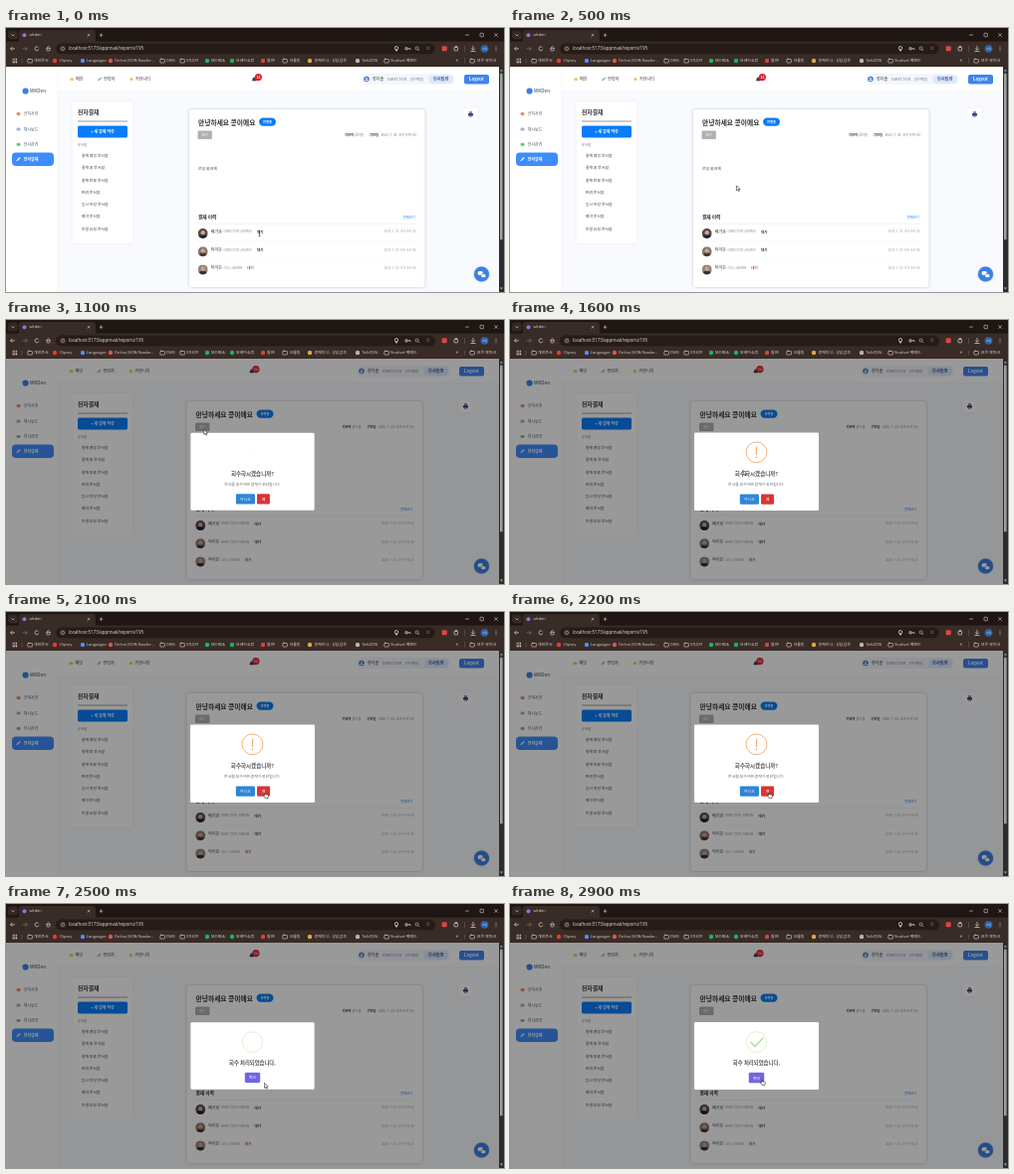
These frames come from a looping animation (500x266 px, 3000 ms). An HTML page with a canvas:

```html
<!DOCTYPE html>
<html lang="ko">
<head>
<meta charset="utf-8">
<style>
html, body { margin: 0; width: 100%; height: 100%; overflow: hidden; background: #fff; }
canvas { display: block; width: 500px; height: 266px; }
</style>
</head>
<body>
<canvas id="stage"></canvas>
<script>
const LOOP = 3000, W = 500, H = 266, PAGE_TOP = 39, PAGE_RIGHT = 495;
const APP = '"Noto Sans CJK KR", "Noto Sans CJK", "Noto Sans", sans-serif';
const CHROME = '"Open Sans", "Noto Sans CJK KR", sans-serif';
const canvas = document.getElementById('stage');
const ctx = canvas.getContext('2d');
const ratio = window.devicePixelRatio || 1;
canvas.width = W * ratio;
canvas.height = H * ratio;

const clamp = (v) => Math.max(0, Math.min(1, v));
const lerp = (a, b, k) => a + (b - a) * k;
const ease = (k) => k * k * (3 - 2 * k);
const move = (x, y) => ctx.transform(1, 0, 0, 1, x, y);

function box(x, y, w, h, r, fill) {
  ctx.fillStyle = fill;
  ctx.beginPath();
  ctx.roundRect(x, y, w, h, r);
  ctx.fill();
}

function frame(x, y, w, h, r, color, width = 0.6) {
  ctx.strokeStyle = color;
  ctx.lineWidth = width;
  ctx.beginPath();
  ctx.roundRect(x, y, w, h, r);
  ctx.stroke();
}

function disc(x, y, r, fill) {
  ctx.fillStyle = fill;
  ctx.beginPath();
  ctx.arc(x, y, r, 0, 7);
  ctx.fill();
}

function ring(x, y, r, color, width = 0.6, from = 0, to = Math.PI * 2) {
  ctx.strokeStyle = color;
  ctx.lineWidth = width;
  ctx.beginPath();
  ctx.arc(x, y, r, from, to);
  ctx.stroke();
}

function line(color, width, ...p) {
  ctx.strokeStyle = color;
  ctx.lineWidth = width;
  ctx.beginPath();
  for (let i = 0; i < p.length; i += 2) ctx.lineTo(p[i], p[i + 1]);
  ctx.stroke();
}

// Drawn at a tenth of a larger font so tiny glyphs keep fractional advances.
function text(s, x, y, size, color, weight = 400, align = 'left', family = APP) {
  ctx.save();
  move(x, y);
  ctx.scale(0.1, 0.1);
  ctx.font = `${weight} ${size * 10}px ${family}`;
  ctx.textAlign = align;
  ctx.textBaseline = 'middle';
  ctx.fillStyle = color;
  ctx.fillText(s, 0, 0);
  ctx.restore();
}

function shifted(dx, draw) {
  ctx.save();
  move(dx, 0);
  draw();
  ctx.restore();
}

function shadowed(blur, color, draw) {
  ctx.save();
  ctx.shadowBlur = blur * ratio;
  ctx.shadowColor = color;
  draw();
  ctx.restore();
}

function pen(x, y, color) {
  line(color, 1.1, x - 1.6, y + 1.6, x + 1.7, y - 1.7);
}

function folder(x, y) {
  frame(x - 2.2, y - 1.5, 4.6, 3.5, 0.5, '#d8d2cf', 0.6);
  line('#d8d2cf', 0.6, x - 2, y - 2, x - 0.2, y - 2);
}

function drawBrowser() {
  const ink = '#dcd6d3';
  box(0, 0, W, 14, 0, '#1e1613');
  box(0, 13.5, W, PAGE_TOP - 13.5, 0, '#392b26');
  box(13, 2, 77, 13, [3, 3, 0, 0], '#392b26');
  box(2, 2.5, 10, 9, 2.5, '#352823');
  line(ink, 0.7, 5.5, 6.4, 7, 7.9, 8.5, 6.4);
  disc(18.5, 7.2, 2, '#9a6bf2');
  text('wkden', 23.5, 7.2, 4, ink, 400, 'left', CHROME);
  const cross = (x, y, r) => {
    line(ink, 0.6, x - r, y - r, x + r, y + r);
    line(ink, 0.6, x + r, y - r, x - r, y + r);
  };
  cross(83, 7.2, 1.2);
  line(ink, 0.6, 93.7, 7.2, 97.3, 7.2);
  line(ink, 0.6, 95.5, 5.4, 95.5, 9);
  line(ink, 0.6, 461, 7, 465, 7);
  frame(476, 5.3, 3.4, 3.4, 0.4, ink, 0.6);
  cross(492, 7, 1.7);

  line(ink, 0.7, 9, 20.8, 4.5, 20.8, 6.5, 18.8);
  line(ink, 0.7, 4.5, 20.8, 6.5, 22.8);
  line('#85776f', 0.7, 16.8, 20.8, 21.3, 20.8, 19.3, 18.8);
  line('#85776f', 0.7, 21.3, 20.8, 19.3, 22.8);
  ring(31, 20.8, 2, ink, 0.7, 0.3, 5.5);
  line(ink, 0.7, 40.2, 20.8, 42.5, 18.6, 44.8, 20.8);
  frame(41, 20.6, 3, 2.3, 0, ink, 0.6);
  box(50, 15.6, 381, 10.6, 5.3, '#261b17');
  disc(57, 20.8, 3.4, '#392b26');
  ring(57, 20.8, 1.6, ink, 0.5);
  text('localhost:5173/approval/reports/195', 63, 20.9, 4.4, '#ece7e4', 400, 'left', CHROME);
  ring(392, 20.2, 1.7, ink, 0.8);
  line(ink, 0.8, 391, 21.7, 392, 23.4, 393, 21.7);
  ring(402, 20.8, 1.2, ink, 0.8);
  line(ink, 0.8, 403.2, 20.8, 406, 20.8, 406, 22);
  ring(412.6, 20.4, 1.5, ink, 0.6);
  line(ink, 0.6, 413.7, 21.5, 415.2, 23);
  text('☆', 424, 20.8, 5.4, ink, 400, 'center', '"DejaVu Sans", sans-serif');
  box(437.7, 18.2, 5, 5, 0.8, '#e0443e');
  frame(450, 19.2, 3.6, 3.6, 0.5, ink, 0.7);
  disc(452, 18.8, 0.9, ink);
  line('#75665f', 0.5, 460.5, 18, 460.5, 24);
  line(ink, 0.7, 469, 18, 469, 22);
  line(ink, 0.7, 467.2, 20.5, 469, 22.3, 470.8, 20.5);
  line(ink, 0.7, 466.5, 23.5, 471.5, 23.5);
  disc(480.5, 20.8, 3.9, '#2763ad');
  text('가람', 480.5, 20.8, 2.6, '#fff', 400, 'center');
  for (const y of [19, 20.8, 22.6]) disc(492, y, 0.5, ink);

  for (let i = 0; i < 9; i++) {
    box(6.6 + (i % 3) * 1.7, 30.7 + Math.floor(i / 3) * 1.7, 1.1, 1.1, 0, ink);
  }
  line('#75665f', 0.5, 16, 30.5, 16, 35.5);
  const marks = [
    [24, '개인문서', 28], [49, 'Clipary', 53.5, '#f03a30'], [77, 'Languages', 81, '#4f8df0'],
    [105, 'Online JSON Reader…', 109, '#d9574f'], [157, 'DMS', 161], [177, 'STUDY', 181],
    [202, 'MOREA', 206, '#18b85c'], [227, '모레아쇼핑', 231, '#18b85c'], [258, '들찬!', 262, '#d8443a'],
    [280, '크롤링', 284.5], [305, '경제지식 : 상담검색', 309.5, '#dba94c'],
    [353, 'TalkZON', 357.5, '#bbb5b2'], [382, 'Studivel 백엔드', 386], [468, '모든 북마크', 473]
  ];
  for (const [iconX, label, x, color] of marks) {
    if (color) disc(iconX, 33, 2.2, color);
    else folder(iconX, 33);
    text(label, x, 33, 3.95, ink, 400, 'left', CHROME);
  }
  text('»', 453, 32.8, 5, ink, 400, 'center', CHROME);
  line('#75665f', 0.5, 460.5, 30.5, 460.5, 35.5);
}

function drawScrollbar() {
  box(PAGE_RIGHT, PAGE_TOP, 5, H - PAGE_TOP, 0, '#2c2c2c');
  box(496, 45.5, 2.6, 168, 1.3, '#a0a0a0');
  ctx.fillStyle = '#a0a0a0';
  for (const [base, tip] of [[43.6, 41.4], [261.6, 263.8]]) {
    ctx.beginPath();
    ctx.moveTo(495.8, base);
    ctx.lineTo(499, base);
    ctx.lineTo(497.4, tip);
    ctx.fill();
  }
}

function drawSidebar() {
  box(0, PAGE_TOP, 52, H - PAGE_TOP, 0, '#fff');
  line('#eceff4', 0.5, 52, PAGE_TOP, 52, H);
  disc(19.6, 63.5, 3.1, '#3b82e8');
  text('WKDen', 24, 63.5, 4.8, '#34435c', 500);
  box(6, 125.6, 42, 13.4, 4, '#3f8cfb');
  const items = [
    ['공지사항', 86.5, '#f08a5c'], ['대시보드', 102, '#92b4dc'],
    ['인사관리', 117.4, '#67c27c'], ['전자결재', 132.2, '#fff']
  ];
  items.forEach(([label, y, color], i) => {
    if (i === 3) pen(12.4, y, color);
    else box(10.6, y - 1.4, 3.8, 2.8, 0.9, color);
    text(label, 17.7, y, 4, i === 3 ? '#fff' : '#555b66', i === 3 ? 700 : 400);
  });
}

function drawHeader(dx) {
  box(52, PAGE_TOP, 443, 24.3, 0, '#fff');
  line('#eef1f6', 0.5, 52, 63.4, PAGE_RIGHT, 63.4);
  shifted(dx * 0.12, () => {
    box(64.2, 50.2, 3.8, 2.8, 0.8, '#f3c760');
    pen(94, 51.5, '#49bd8c');
    disc(126, 51.5, 1.6, '#f0c453');
    [['메인', 70], ['연락처', 98], ['커뮤니티', 130]].forEach(([s, x]) => text(s, x, 51.5, 4.1, '#333', 500));
  });
  shifted(dx / 2, () => {
    disc(249.5, 51.4, 1.9, '#3b3b70');
    box(247, 52, 5, 1.2, 0.4, '#3b3b70');
    disc(253.4, 49.6, 3.6, '#e3222c');
    text('12', 253.4, 49.6, 3.2, '#fff', 700, 'center');
  });
  shifted(dx, () => {
    box(356.5, 46, 94, 11, 5.5, '#f3f6fb');
    disc(362, 51.5, 2.7, '#3c70c8');
    disc(362, 50.7, 0.9, '#fff');
    box(360.5, 52, 3, 1.3, 0.7, '#fff');
    text('류다솔', 368, 51.5, 4.1, '#333', 500);
    text('DIRECTOR', 383, 51.5, 4, '#7a8598');
    text('(마케팅)', 406, 51.5, 3.9, '#7a8598');
    box(424.4, 47.2, 24.8, 8.7, 4.3, '#dfe9f9');
    text('인사팀장', 436.8, 51.5, 4.2, '#3156a5', 700, 'center');
    box(460, 47, 25, 9.6, 2, '#3f83ee');
    text('Logout', 472.5, 51.7, 4.3, '#fff', 700, 'center');
  });
}

function drawMenu() {
  shadowed(2, 'rgba(60,80,120,.12)', () => box(66.5, 74, 60.5, 143, 2, '#fff'));
  text('전자결재', 72, 85, 5.8, '#333', 700);
  line('#555', 0.6, 72, 94, 122, 94);
  box(72, 98.6, 50, 11.8, 1.6, '#087cfa');
  text('+ 새 결재 작성', 97, 104.5, 4, '#fff', 700, 'center');
  text('문서함', 72, 118, 3.4, '#777');
  ['결재 예정 문서함', '결재 중 문서함', '결재 완료 문서함', '반려 문서함', '임시 저장 문서함', '예약 문서함', '전결 요청 문서함']
    .forEach((s, i) => text(s, 75.8, 128.5 + i * 12.3, 3.9, '#444'));
}

function drawAvatar(x, y, back, coat) {
  ctx.save();
  ctx.beginPath();
  ctx.arc(x, y, 5, 0, 7);
  ctx.clip();
  box(x - 5, y - 5, 10, 10, 0, back);
  disc(x, y + 5, 4, coat);
  disc(x, y - 0.7, 2.2, '#c7a492');
  ctx.restore();
}

function drawReport() {
  shadowed(3, 'rgba(40,50,80,.28)', () => box(184, 82, 236.5, 179, 3, '#fff'));
  text('안녕하세요 콩이에요', 193, 95, 6.75, '#333', 700);
  box(254, 90.4, 17, 8.4, 4.2, '#0c7cf2');
  text('진행중', 262.5, 94.6, 3.3, '#fff', 700, 'center');
  box(192.5, 103.5, 14.4, 8.6, 1.2, '#b1b1b1');
  text('회수', 199.7, 107.8, 3.5, '#fff', 400, 'center');
  text('기안자', 340, 108, 3.3, '#333', 700);
  text('류다솔', 350, 108, 3.3, '#777');
  text('기안일', 365, 108, 3.3, '#333', 700);
  const date = '2025. 7. 31. 오후 4:47:25';
  text(date, 412, 108, 3.3, '#777', 400, 'right');
  text('운일 회의제', 193, 142, 3.9, '#444');
  text('결재 이력', 193, 190.7, 4.7, '#222', 700);
  text('전체보기', 411, 190.7, 3.4, '#1677f5', 400, 'right');
  line('#e3e6ea', 0.5, 193, 197.3, 412, 197.3);
  const rows = [
    ['배가온', 'DIRECTOR | ADMIN', 252, '#333', '#554848', '#28242c'],
    ['탁이든', 'DIRECTOR | ADMIN', 252, '#333', '#8b776d', '#403838'],
    ['탁이든', 'CEO | ADMIN', 242.3, '#a5504a', '#94857c', '#33303a']
  ];
  rows.forEach(([name, role, statusX, color, back, coat], i) => {
    const y = 205.2 + i * 18.2;
    drawAvatar(197.7, y + 1.8, back, coat);
    text(name, 205.8, y, 4, '#333', 500);
    text(role, 218.5, y, 3.25, '#858b95');
    text('대기', statusX, y, 3.5, color, 700);
    text(date, 412, y, 3, '#999', 400, 'right');
    if (i < 2) line('#f0f2f5', 0.4, 193, y + 9.6, 412, y + 9.6);
  });
}

function drawPrinter() {
  shadowed(1.5, 'rgba(60,80,120,.15)', () => box(459, 80.3, 15, 13.4, 3, '#fff'));
  box(464, 86, 5, 2.6, 0.5, '#3a3f7c');
  box(465, 84.4, 3, 1.2, 0, '#3a3f7c');
  box(465, 88, 3, 1.6, 0, '#7a80b4');
}

function drawChat() {
  shadowed(2, 'rgba(30,60,120,.35)', () => disc(477.5, 248, 7.6, '#3b80e4'));
  box(473.6, 245, 5.2, 3.9, 1.7, '#fff');
  box(476.6, 247.6, 5, 3.6, 1.6, '#3b80e4');
  box(477.1, 248, 4.4, 3.2, 1.5, '#fff');
}

function drawPage(modal) {
  const dx = modal ? -5 : 0;
  box(0, PAGE_TOP, PAGE_RIGHT, H - PAGE_TOP, 0, '#f8fafd');
  drawSidebar();
  drawHeader(dx);
  drawMenu();
  shifted(dx / 2, drawReport);
  shifted(dx, drawPrinter);
  drawChat();
}

function button(x, y, w, h, label, color) {
  box(x, y, w, h, 1.1, color);
  text(label, x + w / 2, y + h / 2, 3.9, '#fff', 500, 'center');
}

function drawConfirm(ms) {
  box(185, 113.5, 125, 78.5, 1.3, '#fff');
  const k = clamp(ms / 500) ** 2;
  const color = '#f2ad74';
  ctx.save();
  ctx.globalAlpha *= k;
  move(247.5, 133.3);
  ctx.scale(1, Math.abs(Math.cos((1 - k) * 1.745)));
  ring(0, 0, 10.4, color, 0.95);
  ctx.rotate(Math.sin(clamp(ms / 500) * 9.42) * 0.4 * (1 - k));
  line(color, 1.2, 0, -5.8, 0, 2.6);
  disc(0, 5, 0.9, color);
  ctx.restore();
  text('회수하시겠습니까?', 247.5, 155, 5.5, '#545454', 600, 'center');
  text('문서를 회수하면 결재가 중단됩니다.', 247.5, 165.5, 3.85, '#6a6a6a', 400, 'center');
  button(230.8, 175.5, 19.2, 10.2, '아니오', '#3085d6');
  button(252, 175.5, 13, 10.2, '예', '#dd3333');
}

function drawDone(ms) {
  box(185, 119, 125, 68, 1.3, '#fff');
  ring(247.5, 139, 10.3, 'rgba(165,220,134,.4)', 0.95);
  const tip = clamp((ms - 405) / 150), long = clamp((ms - 488) / 142);
  ctx.lineCap = 'round';
  if (tip > 0) line('#a5dc86', 1.25, 241.4, 139.1, lerp(241.4, 245.8, tip), lerp(139.1, 143.5, tip));
  if (long > 0) line('#a5dc86', 1.25, 245.8, 143.5, lerp(245.8, 254.2, long), lerp(143.5, 134.9, long));
  ctx.lineCap = 'butt';
  text('회수 처리되었습니다.', 247.5, 160.2, 5.35, '#545454', 600, 'center');
  box(239.4, 169.5, 16.2, 11.2, 1.7, 'rgba(112,102,224,.4)');
  button(240, 170.1, 15, 10, '확인', '#7066e0');
}

function popScale(ms) {
  if (ms < 135) return lerp(0.7, 1.05, ms / 135);
  if (ms < 240) return lerp(1.05, 0.95, (ms - 135) / 105);
  return lerp(0.95, 1, clamp((ms - 240) / 60));
}

const SPEED = 1.4;
const dialogs = [
  { open: 1020, close: 2230, middle: 152.7, draw: drawConfirm },
  { open: 2420, close: LOOP, middle: 153, draw: drawDone }
];
const CLOSING = 150 / SPEED;

function drawDialog({ open, close, middle, draw }, t) {
  const ms = (t - open) * SPEED;
  const leaving = clamp((t - close) / CLOSING);
  const scale = popScale(ms) * (1 - leaving / 2);
  ctx.fillStyle = `rgba(0,0,0,${0.4 * clamp(ms / 100) * (1 - leaving)})`;
  ctx.fillRect(0, PAGE_TOP, PAGE_RIGHT, H - PAGE_TOP);
  ctx.save();
  ctx.globalAlpha = 1 - leaving;
  move(247.5, middle);
  ctx.scale(scale, scale);
  move(-247.5, -middle);
  draw(ms);
  ctx.restore();
}

// time, x, y, pointer shape from that time on
const track = [
  [0, 254.5, 207, 'beam'], [150, 254.5, 207, 'arrow'], [850, 200.5, 111, 'hand'], [1000, 200, 110.5, 'hand'],
  [1060, 198.8, 110.2, 'arrow'], [1300, 199, 111, 'arrow'], [1850, 260.5, 181.5, 'hand'],
  [2280, 260, 181.5, 'arrow'], [2550, 259.5, 180.3, 'arrow'], [2800, 253, 176.5, 'hand'], [LOOP, 253, 176.5, 'hand']
];

const shapes = {
  arrow: 'M0 0V5L1.2 4 2 5.8 2.9 5.4 2.1 3.7H3.7Z',
  hand: 'M-.5 .4Q0-.4 .5 .4V2.3L3 2.8Q3.6 3 3.4 4L2.8 6H.2L-1.7 3.7Q-1.5 2.8-.5 3.5Z',
  beam: 'M-1-2.7H1M0-2.7V2.7M-1 2.7H1'
};

function drawPointer(t) {
  const i = Math.max(0, track.findIndex((p) => p[0] > t) - 1);
  const [t0, x0, y0, shape] = track[i];
  const [t1, x1, y1] = track[i + 1];
  const k = ease((t - t0) / (t1 - t0));
  const path = new Path2D(shapes[shape]);
  ctx.save();
  move(lerp(x0, x1, k), lerp(y0, y1, k));
  ctx.strokeStyle = '#222';
  ctx.lineWidth = 0.6;
  ctx.fillStyle = '#fff';
  if (shape !== 'beam') ctx.fill(path);
  ctx.stroke(path);
  ctx.restore();
}

function render(now) {
  const t = now % LOOP;
  const dialog = dialogs.find((d) => t >= d.open && t < d.close + CLOSING);
  ctx.setTransform(ratio, 0, 0, ratio, 0, 0);
  drawPage(Boolean(dialog));
  if (dialog) drawDialog(dialog, t);
  drawBrowser();
  drawScrollbar();
  drawPointer(t);
}

const start = performance.now();
function tick() {
  render(performance.now() - start);
  requestAnimationFrame(tick);
}
tick();
</script>
</body>
</html>
```
